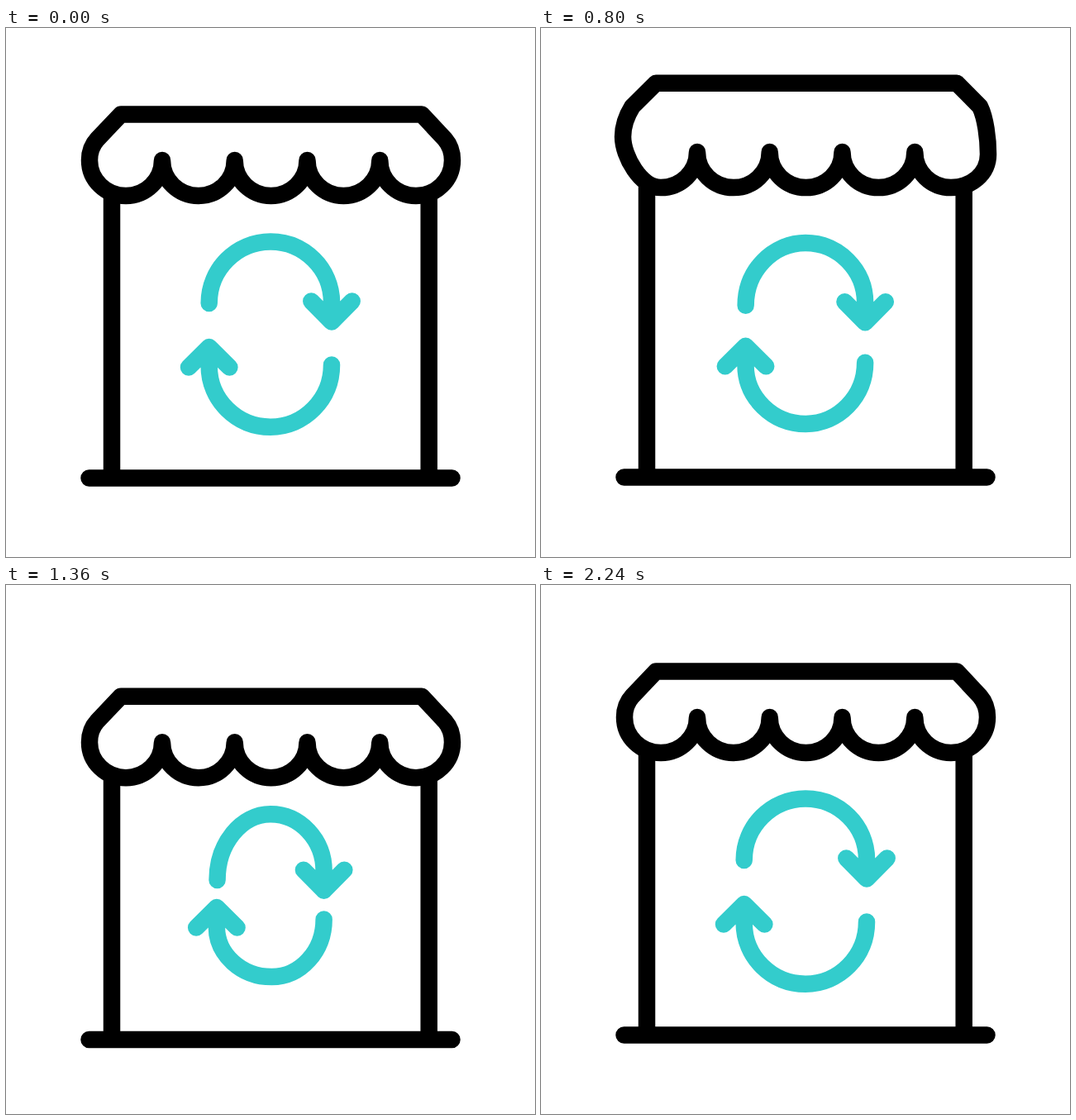
Write an HTML page that moves like this. It is 640x640 px and loops after 2.54 s.

```html
<!DOCTYPE html>
<html lang="en">
<head>
<meta charset="utf-8">
<title>Shop refresh</title>
<style>
html, body { margin: 0; width: 100%; height: 100%; overflow: hidden; background: #fff; }
svg { display: block; width: 100%; height: 100%; }
path { fill: none; stroke-width: 20.5; stroke-linecap: round; stroke-linejoin: round; }
.ink { stroke: #000; }
.teal { stroke: #33cccc; }
</style>
</head>
<body>
<svg id="stage" viewBox="0 0 640 640">
  <g id="shop"></g>
  <g id="rays"></g>
</svg>
<script>
const LOOP = 2540;
const shop = document.getElementById('shop');
const rays = document.getElementById('rays');

function addPath(parent, cls, d = '') {
  const p = document.createElementNS('http://www.w3.org/2000/svg', 'path');
  p.setAttribute('class', cls);
  p.setAttribute('d', d);
  parent.appendChild(p);
  return p;
}

const clamp = v => Math.max(0, Math.min(1, v));
const smooth = u => u * u * (3 - 2 * u);
const ease = (t, from, to) => smooth(clamp((t - from) / (to - from)));

// Eased value along [time, value] keys.
function track(t, keys) {
  let value = keys[0][1];
  for (let i = 1; i < keys.length; i++) {
    const [t0, v0] = keys[i - 1], [t1, v1] = keys[i];
    if (t >= t0) value = v0 + (v1 - v0) * ease(t, t0, t1);
  }
  return value;
}

// Shows the part of a path between two fractions of its length.
function trim(path, start, end) {
  const visible = end - start > 0.001;
  path.style.display = visible ? '' : 'none';
  if (!visible) return;
  path.setAttribute('pathLength', 1);
  path.setAttribute('stroke-dasharray', `${end - start} 2`);
  path.setAttribute('stroke-dashoffset', -start);
}

const posts = addPath(shop, 'ink');
const awning = addPath(shop, 'ink');
const arrows = addPath(shop, 'teal');
const glints = [0, 1, 2, 3].map(() => addPath(shop, 'ink'));

// Each ray: inner point, outer point.
const rayPaths = [
  [192, 311, 136, 279.5], [189, 361.4, 127, 358], [190, 417.5, 137, 461.5],
  [453, 313, 506, 267], [455, 368.8, 517, 370.4], [453, 418, 509, 450]
].map(([x1, y1, x2, y2]) => addPath(rays, 'teal', `M${x1} ${y1}L${x2} ${y2}`));

function awningShape(t) {
  const drop = track(t, [[240, 0], [500, 25], [900, 0], [1233, 25], [1340, 25], [1640, 0]]);
  const tall = track(t, [[500, 0], [900, 1], [1233, 0]]);
  const top = 104.5 + drop - 48 * tall;
  const tip = 160 + drop - 15 * tall;
  const low = tip + 43;
  const shoulder = top + 30 - 2 * tall;
  const leftX = 101 - 2.3 * tall, leftY = tip - 22 * tall;
  const rightX = 540 + 1.2 * tall, rightY = tip + 3 * tall;
  const edge = [540, 452.3, 364.5, 276.7, 189];
  let d = `M139 ${top}H503L531 ${shoulder}C${537 + tall} ${shoulder + 7 + 8 * tall} `
    + `${rightX} ${rightY - 10 - 10 * tall} ${rightX} ${rightY}`
    + `C${rightX} ${rightY + 24} 520 ${low} 496 ${low}S452.3 ${tip + 24} 452.3 ${tip}`;
  for (let i = 2; i < edge.length; i++) {
    const x = edge[i], mid = x + 43.9;
    d += `C${x + 87.8} ${tip + 24} ${mid + 24} ${low} ${mid} ${low}S${x} ${tip + 24} ${x} ${tip}`;
  }
  d += `C189 ${tip + 24} 169 ${low} 145 ${low}S${leftX} ${leftY + 24} ${leftX} ${leftY}`
    + `C${leftX} ${leftY - 10 - 6 * tall} 104 ${shoulder + 7 + 4 * tall} 110.5 ${shoulder}Z`;
  return { d, low };
}

// A quarter-ellipse leaving vertically and arriving horizontally, or reversed.
function quarter(x0, y0, x1, y1, vertical) {
  const k = 0.552, dx = (x1 - x0) * k, dy = (y1 - y0) * k;
  return vertical
    ? `C${x0} ${y0 + dy} ${x1 - dx} ${y1} ${x1} ${y1}`
    : `C${x0 + dx} ${y0} ${x1} ${y1 - dy} ${x1} ${y1}`;
}

function arrowShapes(squash) {
  const at = (rest, delta) => rest + delta * squash;
  const arc = (x, tipY, sideY, midX, midY, endX, endY) =>
    `M${x} ${tipY}V${sideY}` + quarter(x, sideY, midX, midY, true)
    + quarter(midX, midY, endX, endY, false);
  const rx = at(394, -9.5), lx = at(245.7, 9.3);
  const upTip = at(355.5, 8.8), lowTip = at(386, -1.5);
  return [
    arc(rx, upTip, at(332, 9), 320, at(258.5, 13.5), at(245.7, 10), at(333, 18.7)),
    `M${rx + 24.7} ${upTip - 25}L${rx} ${upTip}L${rx - 24.7} ${upTip - 25}`,
    arc(lx, lowTip, at(409, -1), at(320, 1.5), at(482.7, -14.3), rx, at(407.5, -8.7)),
    `M${lx - 24.7} ${lowTip + 24.5}L${lx} ${lowTip}L${lx + 24.7} ${lowTip + 24.5}`
  ];
}

function draw(t) {
  const lift = track(t, [[330, 0], [600, 6], [1020, -9], [1260, 6], [1300, 6], [1640, 0]]);
  shop.setAttribute('transform', `translate(0 ${lift})`);

  const { d, low } = awningShape(t);
  awning.setAttribute('d', d);
  posts.setAttribute('d', `M128 ${low}V544.5M511.7 ${low}V544.5M100.5 544.5H539.5`);

  const squash = track(t, [[240, 0], [500, 1], [920, 0], [1190, 1], [1340, 1], [1640, 0]]);
  const shapes = arrowShapes(squash);
  arrows.setAttribute('d', shapes.join(''));

  const head = ease(t, 1650, 2060), tail = ease(t, 1830, 2240);
  glints.forEach((g, i) => {
    g.setAttribute('d', shapes[i]);
    trim(g, tail, head);
  });

  const out = ease(t, 960, 1200), fade = ease(t, 1060, 1300);
  rayPaths.forEach(r => trim(r, fade, out));
}

const began = performance.now();
function tick() {
  draw((performance.now() - began) % LOOP);
  requestAnimationFrame(tick);
}
draw(0);
requestAnimationFrame(tick);
</script>
</body>
</html>
```
